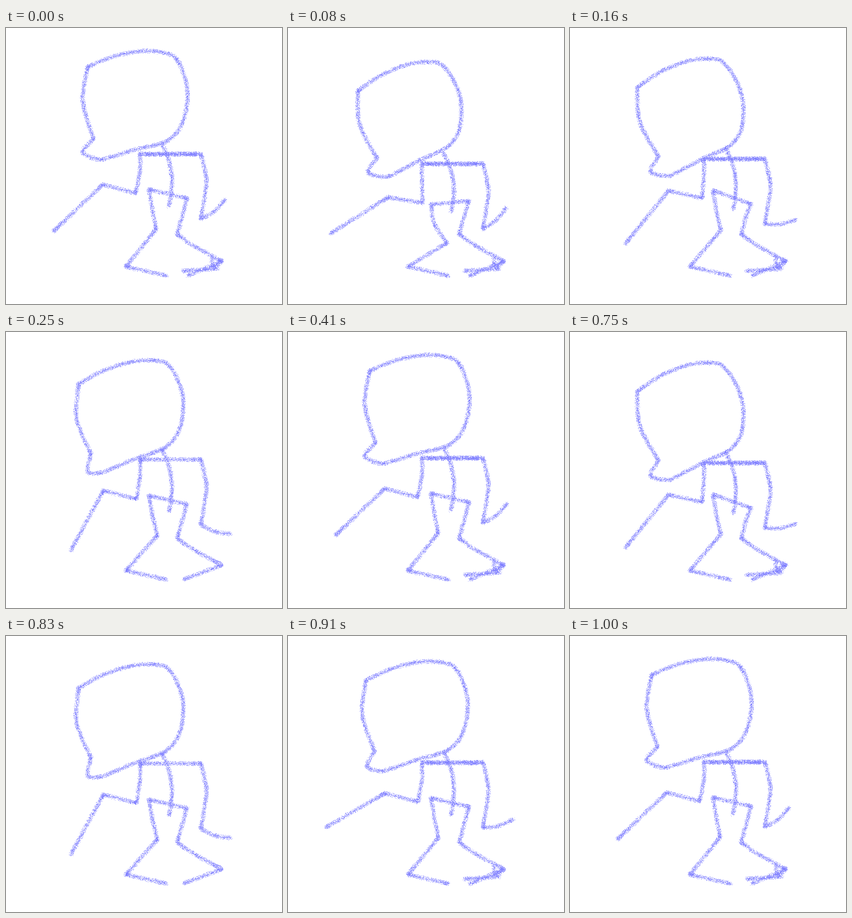
Animation, 512 px wide and 512 px high, one loop 1160 ms. Source, as an HTML page with a canvas:

```html
<!DOCTYPE html>
<html lang="en">
<head>
<meta charset="utf-8">
<title>Crayon idle loop</title>
<style>
html, body { margin: 0; width: 100%; height: 100%; overflow: hidden; background: #fff; }
canvas { display: block; width: 512px; height: 512px; }
</style>
</head>
<body>
<canvas id="stage" width="512" height="512"></canvas>
<script>
// sink: shoulder drop; hips: heights; swing, bend: forearm angles in degrees;
// head: forehead, mouth and temple, which place the whole skull.
const rest = { sink: 0, hips: [299, 315], swing: 136.6, bend: -39, head: [[151, 72], [162, 205], [329, 84]], chin: [142, 230] };
const crouch = { sink: 18, hips: [327, 320], swing: 147.7, bend: -42, head: [[129, 116], [165, 241], [304, 92]], chin: [148, 267] };
const lean = { sink: 9, hips: [301, 326], swing: 129.3, bend: -8, head: [[124, 110], [164, 238], [302, 87]], chin: [149, 266] };
const rise = { sink: 3, hips: [303, 319], swing: 118.5, bend: 17, head: [[134, 96], [157, 225], [317, 86]], chin: [151, 258], cleanFoot: true };
const settle = { sink: 1, hips: [300, 316], swing: 150, bend: -15, head: [[144, 82], [160, 213], [324, 85]], chin: [146, 241] };

const skull = [[151, 72], [200, 52], [255, 42], [295, 46], [315, 56], [329, 84], [336, 115],
  [334, 150], [322, 185], [303, 206], [283, 215], [240, 225], [190, 240], [170, 243]];
const face = [[151, 72], [142, 125], [147, 160], [162, 205]];

const minus = (p, q) => [p[0] - q[0], p[1] - q[1]];
const cross = (p, q) => p[0] * q[1] - p[1] * q[0];
const polar = (p, degrees, length) => {
  const angle = degrees * Math.PI / 180;
  return [p[0] + length * Math.cos(angle), p[1] + length * Math.sin(angle)];
};

// Carries a point of the resting head to its place in another pose
function placeOnHead([forehead, mouth, temple]) {
  const [f0, m0, t0] = rest.head;
  const u0 = minus(f0, m0), v0 = minus(t0, m0);
  const u = minus(forehead, mouth), v = minus(temple, mouth);
  return point => {
    const p = minus(point, m0), area = cross(u0, v0);
    const a = cross(p, v0) / area, b = cross(u0, p) / area;
    return mouth.map((m, i) => m + a * u[i] + b * v[i]);
  };
}

function strokesOf({ sink, hips, swing, bend, head, chin, cleanFoot }) {
  const place = placeOnHead(head), y = 233 + sink;
  const left = [248, y], right = [361, y];
  const elbow = [240 + sink / 2, y + 73], wrist = [179 + sink * 0.35, 290 + sink * 1.3];
  const backElbow = [361, y + 121];
  const hipLeft = [265, hips[0]], hipRight = [335, hips[1]];
  const drop = hips[0] - 299, knee = [278 + drop * 0.6, 373 + drop * 0.9];
  const backKnee = [317, 382], heel = [222, 442], ankle = [400, 432];
  const strokes = [
    [...skull.map(place), chin, head[1]],
    face.map(place),
    [[288, y - 20], [301, y + 10], [307, y + 43], [306, y + 72], [302, 331 + sink / 2]],
    [left, right],
    [left, [248, y + 30], elbow],
    [elbow, wrist],
    [wrist, polar(wrist, swing, 126)],
    [right, [368, y + 29], [371, y + 58], backElbow],
    [backElbow, polar(backElbow, bend + 9, 29), polar(backElbow, bend, 58)],
    [hipLeft, hipRight],
    [hipLeft, [hipLeft[0] + 6, (hips[0] + knee[1]) / 2], knee],
    [knee, heel],
    [heel, [297, 459]],
    [hipRight, [326, 350], backKnee],
    [backKnee, [345, 402], ankle]
  ];
  if (cleanFoot) return [...strokes, [ankle, [330, 458]]];
  return [...strokes, [[258, y + 1], [350, y + 1]],
    [ankle, [337, 459]], [[327, 450], [392, 446]], [[381, 426], [385, 443], ankle]];
}

function randomizer(seed) {
  return () => {
    seed = (Math.imul(seed, 1664525) + 1013904223) >>> 0;
    return seed / 4294967296;
  };
}

// Catmull-Rom value between b and c
const spline = (a, b, c, d, t) =>
  b + t * ((c - a) + t * (2 * a - 5 * b + 4 * c - d + t * (3 * (b - c) + d - a))) / 2;

function crayon(ctx, points, random) {
  for (let i = 0; i < points.length - 1; i++) {
    const b = points[i], c = points[i + 1], a = points[i - 1] || b, d = points[i + 2] || c;
    const length = Math.hypot(...minus(c, b));
    for (let n = length * 9; n > 0; n--) {
      const t = random();
      const center = [0, 1].map(k => spline(a[k], b[k], c[k], d[k], t));
      const [x, y] = polar(center, random() * 360, 4.5 * Math.pow(random(), 0.7));
      ctx.globalAlpha = 0.3 + 0.5 * random();
      ctx.fillRect(Math.round(x), Math.round(y), 1, 1);
    }
  }
}

function drawPose(pose, index) {
  const canvas = document.createElement('canvas');
  canvas.width = canvas.height = 512;
  const ctx = canvas.getContext('2d'), random = randomizer(index * 977 + 5);
  ctx.fillStyle = '#7c7cff';
  for (const stroke of strokesOf(pose)) crayon(ctx, stroke, random);
  return canvas;
}

// Two rounds through the five poses
const pictures = [rest, crouch, lean, rise, settle].map(drawPose);
const starts = [0, 80, 160, 250, 330, 410, 660, 750, 830, 910, 1000];
const stage = document.getElementById('stage').getContext('2d');
const begin = performance.now();

function show() {
  const time = (performance.now() - begin) % 1160;
  const step = starts.filter(s => s <= time).length - 1;
  stage.fillStyle = '#fff';
  stage.fillRect(0, 0, 512, 512);
  stage.drawImage(pictures[step % 5], 0, 0);
  requestAnimationFrame(show);
}
show();
</script>
</body>
</html>
```
